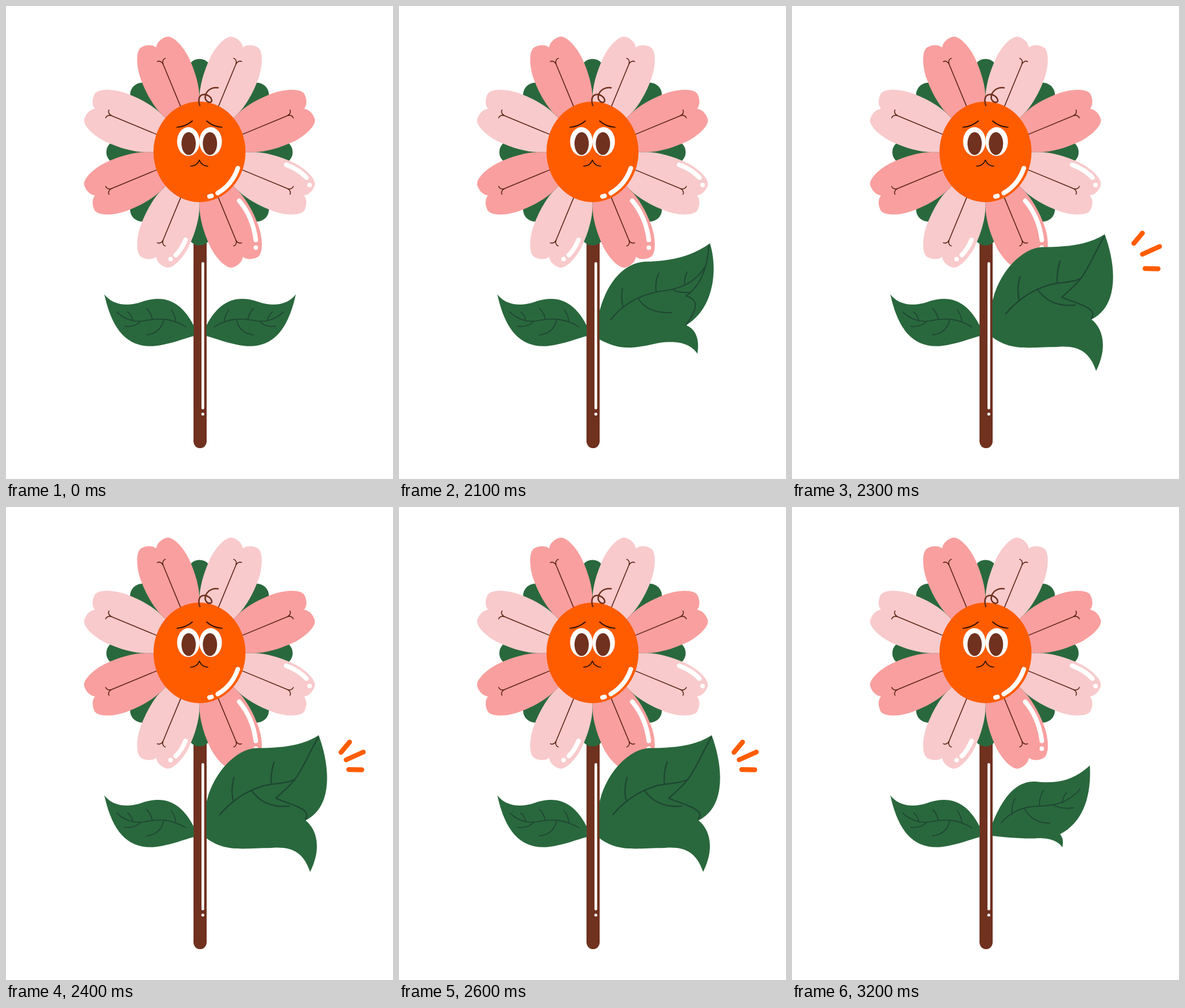
Recreate the animation shown at these times as an HTML page. Size 677 by 827 pixels, loop 3.3 s.

```html
<!DOCTYPE html>
<html lang="en">
<head>
<meta charset="utf-8">
<title>Waving flower</title>
<style>
  html, body { margin: 0; width: 100%; height: 100%; overflow: hidden; background: #fff; }
  svg { display: block; width: 100%; height: 100%; }
  path { fill: none; stroke-linecap: round; stroke-linejoin: round; }
  .blade { fill: #29683d; }
  .veins { stroke: #1f4733; stroke-width: 1.8; }
  .thick { stroke-width: 2.5; }
  .light { fill: #f8cacc; }
  .dark { fill: #f99f9f; }
  .petal { fill: inherit; }
  .brown { fill: #70311f; }
  .rib { stroke: #5c2414; stroke-width: 1.6; }
  .sepal { stroke: #29683d; stroke-width: 42; }
  .ink { stroke: #1c0a04; stroke-width: 1.7; }
  .curl { stroke: #70311f; stroke-width: 2.6; }
  .shine { stroke: #fff; stroke-width: 8; }
  .white { fill: #fff; }
  .spark { stroke: #ff5c00; stroke-width: 8.4; }

  .pose, .sparks { visibility: hidden; animation: 3300ms step-end infinite; }
  .rest { animation-name: rest; }
  .low { animation-name: low; }
  .mid { animation-name: mid; }
  .high { animation-name: high; }
  .sparks { animation-name: sparks; }
  .sparks path { animation: fly 3300ms step-end infinite; }

  @keyframes rest { 0% { visibility: visible } 60.606%, 100% { visibility: hidden } }
  @keyframes low {
    0%, 63.636%, 100% { visibility: hidden }
    60.606%, 96.969% { visibility: visible }
  }
  @keyframes mid {
    0%, 66.666%, 96.969%, 100% { visibility: hidden }
    63.636%, 93.939% { visibility: visible }
  }
  @keyframes high {
    0%, 93.939%, 100% { visibility: hidden }
    66.666% { visibility: visible }
  }
  @keyframes sparks {
    0%, 93.939%, 100% { visibility: hidden }
    69.696% { visibility: visible }
  }
  @keyframes fly {
    0%, 72.727%, 78.787%, 100% { transform: none }
    69.696%, 75.757% { transform: translate(var(--x), var(--y)) }
  }
</style>
</head>
<body>
<svg viewBox="0 0 677 827" xmlns="http://www.w3.org/2000/svg">
  <defs>
    <g id="petal">
      <path class="petal" d="M0 0L-36 -87C-44 -106 -47 -132 -46 -158C-45 -181 -35 -208 -23 -208.5C-12 -209 -4 -205 0 -198C4 -205 12 -209 23 -208.5C35 -208 45 -181 46 -158C47 -132 44 -106 36 -87Z"/>
      <path class="rib" d="M0 -80V-168M-7.5 -174.5C-4 -175 0 -172 0 -166C0 -172 4 -175 7.5 -174.5"/>
    </g>
    <g id="leaf">
      <path class="blade" d="M172 504C186 523 212 526 237 517.5C281 502 309 521 328.5 559V577C312 581 290 591 260 594.5C214 598 186 569 172 504Z"/>
      <path class="veins" d="M194 535C208 549 228 554 244 550C270 545 290 546 315 561M213 535Q220 540 222 551M246 529Q254 537 256 548M289 531Q296 540 297 551M208 560Q226 562 236 551M246 575Q271 572 276 548"/>
    </g>
  </defs>

  <rect class="brown" x="328" y="390" width="23" height="383" rx="11.5"/>
  <path class="shine" style="stroke-width:4.7" d="M344.3 450V703"/>
  <circle class="white" cx="344.3" cy="713.5" r="2.6"/>
  <use href="#leaf"/>

  <g id="head" transform="translate(338.5 255.5)"></g>
  <ellipse cx="338.5" cy="255" rx="80.5" ry="88" fill="#ff5c00"/>

  <path class="curl" d="M339 174C336 165 337 157 344 155C352 153 360 160 360 166C358 171 350 168 348.5 161C348 150 358 141 371 143"/>
  <g class="white">
    <ellipse cx="319" cy="237" rx="19.7" ry="25.3"/>
    <ellipse cx="358" cy="237" rx="19.7" ry="25.3"/>
  </g>
  <g class="brown">
    <ellipse cx="319.5" cy="240.5" rx="12.5" ry="20"/>
    <ellipse cx="356.8" cy="240.5" rx="12.5" ry="20"/>
  </g>
  <path class="ink" d="M299 212Q314 211 326 201M351 201Q362 211 378 212M323 280Q334 280 338.3 269.5Q343 280 353 280"/>

  <path class="shine" d="M405.5 283.5Q396 312 370.5 327M356 333L359.5 332M490 277.5Q511 285 525.5 300M408 340.5Q432 369 437 409M314 409Q307 426 297 435.5"/>
  <g class="white">
    <circle cx="531" cy="313" r="4"/>
    <circle cx="437" cy="422.5" r="4"/>
    <circle cx="288" cy="442.5" r="4"/>
  </g>

  <g class="pose rest"><use href="#leaf" transform="matrix(-1 0 0 1 679 0)"/></g>

  <g class="pose low">
    <path class="blade" d="M350.5 553C366 515 388 479 425 480C470 485 495 475 521 452C524 500 512 550 469 572C474 578 475 585 473 595C463 580 440 578 425 579.5C395 580 370 577 350.5 575Z"/>
    <path class="veins" d="M366 552C385 530 408 523 432 523C465 522 485 515 504 493M390 510Q384 520 385 538M440 495Q432 508 433 522M480 499Q473 508 473 518M407 528Q420 552 451 553M457 521Q473 529 492 526"/>
  </g>

  <g class="pose mid">
    <path class="blade" d="M350.5 534C362 491 388 450 430 447C475 446 512 438 544 415C559 464 549 531 502 558C520 565 526 584 522 608C509 589 486 585 455 589C405 600 388 602 350.5 583Z"/>
    <path class="veins" style="stroke-width:2.1" d="M370 549C400 510 440 500 470 497C500 492 522 478 535 456M542 418C541 448 531 488 502 507C526 513 522 530 502 558M391 493Q388 510 392 527M455 467Q447 482 450 500M504 465Q499 475 500 488M419 512Q435 538 477 536M480 497Q492 502 510 501"/>
  </g>

  <g class="pose high">
    <path class="blade" d="M350.5 517C361 468 400 424 437 421.5C482 421 518 418 547 399C566 450 574 523 524 548C542 562 554 594 532 638C521 606 503 593 465 596C410 597 383 603 350.5 579Z"/>
    <path class="veins thick" d="M374 538C400 508 425 495 452 487C475 482 490 484 506 476M546 403C530 430 518 462 503 479C494 490 482 500 472 509C492 518 511 522 522 531C528 536 527 541 524 546M399 473Q393 490 397 512M469 446Q463 463 464 483M429 495C443 515 463 526 495 523"/>
  </g>

  <g class="sparks">
    <path class="spark" style="--x:12px;--y:-14px" d="M586 429L601 411"/>
    <path class="spark" style="--x:18px;--y:-8px" d="M595 442L625 428.5"/>
    <path class="spark" style="--x:18px;--y:0px" d="M599.5 459L622.5 459.5"/>
  </g>
</svg>
<script>
  // Eight sepals behind eight petals of alternating tint
  const around = (start, draw) => Array.from({ length: 8 }, (_, i) => draw(start + i * 45, i)).join('');
  document.getElementById('head').innerHTML =
    around(0, a => `<path class="sepal" transform="rotate(${a})" d="M0 -60V-142"/>`) +
    around(22.5, (a, i) => `<use href="#petal" class="${i % 2 ? 'dark' : 'light'}" transform="rotate(${a})"/>`);
</script>
</body>
</html>
```
